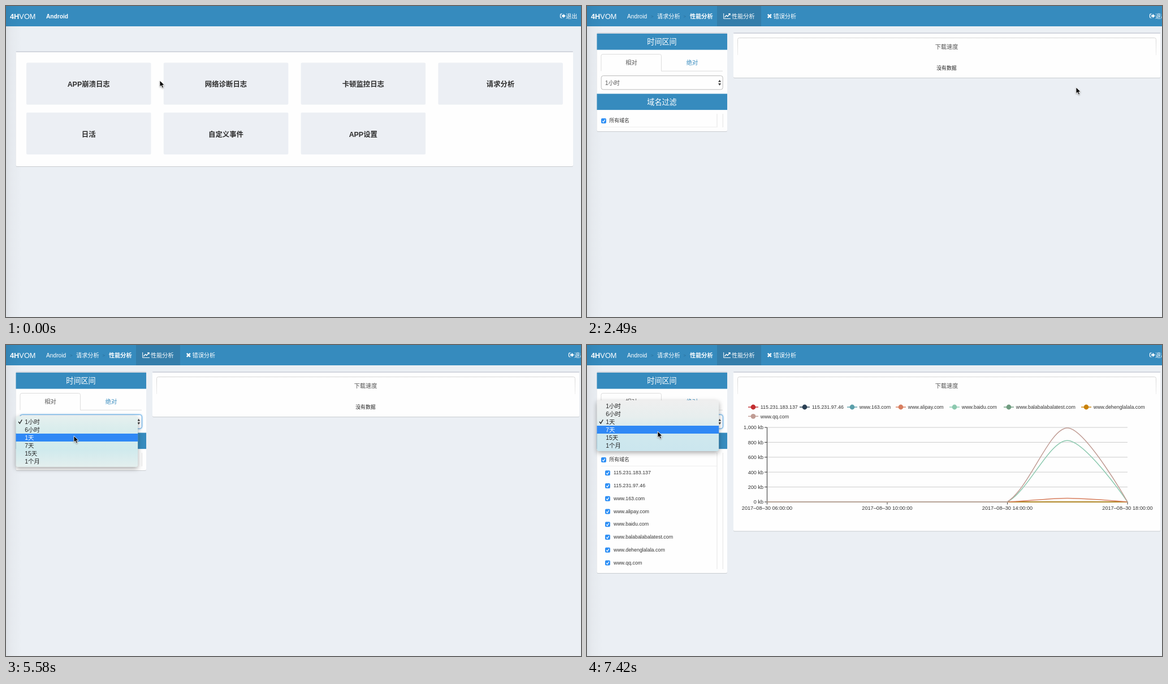
An HTML page that plays this animation: 1017x551 px, repeating every 8000 ms.

```html
<!DOCTYPE html>
<html lang="zh-CN">
<head>
<meta charset="utf-8">
<style>
  html, body { margin: 0; width: 100%; height: 100%; overflow: hidden; background: #ebeff4; }
  svg { display: block; width: 1017px; height: 551px;
    font-family: "Liberation Sans", "Noto Sans CJK SC", "Noto Sans CJK", sans-serif; }
  .panel { filter: drop-shadow(0 1px .7px rgba(0,0,0,.14)); }
  .menu { filter: drop-shadow(0 3px 4px rgba(0,0,0,.34)); }
  .focus { filter: drop-shadow(0 0 1.6px #66afe9); }
</style>
</head>
<body>
<svg id="stage" viewBox="0 0 1017 551"></svg>
<script>
const BLUE = '#368bbe', GREY = '#d2d6de', SIZE = 10.2, SMALL = 8.9, ROW = 14;
const HOURS = ['1小时', '6小时', '1天', '7天', '15天', '1个月'];
const SERIES = [
  { name: '115.231.183.137', color: '#c32e30', x: 294, peak: 0 },
  { name: '115.231.97.46', color: '#2a4054', x: 385, peak: 0 },
  { name: 'www.163.com', color: '#5b9faa', x: 469, peak: 0 },
  { name: 'www.alipay.com', color: '#d87e5f', x: 555, peak: 50 },
  { name: 'www.baidu.com', color: '#8cc9af', x: 650, peak: 824 },
  { name: 'www.balabalabalatest.com', color: '#6f9c80', x: 746, peak: 0 },
  { name: 'www.dehenglalala.com', color: '#c98208', x: 883, peak: 0 },
  { name: 'www.qq.com', color: '#c09c94', x: 294, peak: 992 }];

const rect = (x, y, w, h, fill, more = '') =>
  `<rect x="${x}" y="${y}" width="${w}" height="${h}" fill="${fill}" ${more}/>`;
const path = (d, stroke, more = '') => `<path d="${d}" fill="none" stroke="${stroke}" ${more}/>`;
const shape = (d, fill) => `<path d="${d}" fill="${fill}"/>`;
// y is the vertical centre of the line
const text = (x, y, str, size, fill, more = '') =>
  `<text x="${x}" y="${y + size * .37}" font-size="${size}" fill="${fill}" ${more}>${str}</text>`;
const MID = 'text-anchor="middle"', BOLD = 'font-weight="bold"';
const group = (id, body, more = '') => `<g id="${id}" ${more}>${body}</g>`;

const panel = (x, y, w, h) => `<g class="panel">${rect(x, y, w, h, '#fefefe', 'rx="2"')}</g>` +
  rect(x, y, w, 2, GREY, 'rx="1"');

const checkbox = (x, y) => rect(x, y, 9, 9, '#2e8ff5', 'rx="2"') +
  path(`M${x + 2.2} ${y + 4.8}l1.8 2 2.8-4.4`, '#fff', 'stroke-width="1.2"');

const exit = x => path(`M${x + 3.5} 14.2h-1.5q-1.5 0-1.5 1.5v3.8q0 1.5 1.5 1.5h1.5`, '#fff', 'stroke-width="1.2"') +
  shape(`M${x + 3} 16.2h2.6v-2.4l4 3.8-4 3.8v-2.4h-2.6z`, '#fff') + text(x + 10, 18, '退出', SIZE, '#fff');

function home() {
  const labels = ['APP崩溃日志', '网络诊断日志', '卡顿监控日志', '请求分析', '日活', '自定义事件', 'APP设置'];
  const cards = labels.map((label, i) => {
    const x = 36 + 242.8 * (i % 4), y = i < 4 ? 100.5 : 188.7;
    return rect(x, y, 220.5, 74.3, '#eceff4', 'rx="2"') +
      text(x + 110.2, y + 38.3, label, 12.4, '#2d2d2d', MID + ' font-weight="600"');
  });
  return text(71, 18, 'Android', SIZE, '#fff', BOLD) + exit(980) + panel(17.5, 80, 985.5, 204) + cards.join('');
}

function nav() {
  const label = (x, str, more) => text(x, 18, str, SIZE, '#fff', more);
  const chevron = x => text(x, 18.5, '&gt;', 8, '#2a6f98');
  return rect(230, 0, 78, 36, '#347daa') +
    label(71, 'Android') + chevron(113) + label(124, '请求分析') + chevron(170.5) + label(182, '性能分析', BOLD) +
    path('M241.7 13v9.4H254', '#fff') +
    path('M243.5 20l3-3.6 2.2 2 4-4.5M250.2 13.7h2.8v2.8', '#fff', 'stroke-width="1.4"') +
    label(256, '性能分析') +
    path('M319.8 14.8l6 6m0-6l-6 6', '#fff', 'stroke-width="2.4"') +
    label(329.5, '错误分析') + exit(995);
}

function filters() {
  const heading = (y, label) => rect(17.5, y, 230.5, 28.6, BLUE) +
    text(132.5, y + 14.5, label, 13.1, '#fff', MID + ' font-weight="500"');
  const side = bottom => path(`M230 191V${bottom}M240.3 191V${bottom}`, '#e3e3e3');
  const select = stroke => rect(25.2, 123.6, 215, 24.4, '#fefefe', `rx="3.5" stroke="${stroke}"`);
  const items = SERIES.map(({ name }, i) => {
    const y = 226 + 22.75 * i;
    return checkbox(32, y - 3.8) + text(47, y, name, SMALL, '#333');
  }).join('');
  return group('shortPanel', panel(17.5, 47, 230.5, 175) + side(215)) +
    group('longPanel', panel(17.5, 47, 230.5, 357) + side(397) + items) +
    heading(49, '时间区间') +
    path('M25 115.3V88.5q0-3 3-3H128.5q3 0 3 3V115.3H240', '#ddd') +
    text(78.5, 100.5, '相对', SIZE, '#555', MID) + text(186, 100.5, '绝对', SIZE, BLUE, MID) +
    select('#bbb') + group('focus', select('#6db3ea'), 'class="focus"') +
    group('choice', text(32, 136, HOURS[0], SIZE, '#555')) +
    shape('M232 134.7l2.6-4 2.6 4zM232 137l2.6 4 2.6-4z', '#444') +
    heading(155.5, '域名过滤') +
    checkbox(25, 199) + text(39.5, 202.5, '所有域名', SMALL, '#333') + path('M25 214.5H230', '#eee');
}

// Traffic from 14:00 to 18:00 with its peak in the middle; busy hosts also draw the idle hours before
function seriesPath(peak) {
  const step = 106.4, base = 278, x = 743.2, end = x + 2 * step, smooth = .3;
  if (!peak) return `M${x} ${base}H${end}`;
  const rise = peak * .132, top = base - rise, mid = x + step;
  const length = Math.hypot(step, rise), part = smooth * length / (length + step);
  return `M318.5 ${base}H${x}C${x + 2 * step * part} ${base - rise * part} ${mid - step * smooth} ${top} ${mid} ${top}` +
    `S${end} ${base} ${end} ${base}`;
}

function chart() {
  let out = '';
  SERIES.forEach(({ name, color, x }, i) => {
    const y = i < 7 ? 110 : 126.3;
    out += path(`M${x - 9} ${y}h18`, color, 'stroke-width="1.4"') +
      `<circle cx="${x}" cy="${y}" r="4.4" fill="${color}"/>` + text(x + 12.8, y, name, SMALL, '#333');
  });
  for (let i = 0; i <= 5; i++) {
    const y = 278 - 26.4 * i;
    out += path(`M318.5 ${y}H956`, '#ccc') + path(`M314 ${y}h4.5`, '#333') +
      text(312, y, (200 * i).toLocaleString('en') + ' kb', 9.1, '#333', 'text-anchor="end"');
  }
  out += path('M318.5 146V278.5H956', '#333');
  ['06', '10', '14', '18'].forEach((hour, i) => {
    const x = 318.5 + 212.5 * i;
    out += path(`M${x} 278v4.5`, '#333') + text(x, 288.3, `2017–08–30 ${hour}:00:00`, 9.2, '#333', MID);
  });
  const lines = [...SERIES].sort((a, b) => a.peak - b.peak)
    .map(({ color, peak }) => path(seriesPath(peak), color, 'stroke-width="1.5"'));
  return out + `<g clip-path="url(#reveal)">${lines.join('')}</g>`;
}

function results() {
  return group('noData', panel(259, 47, 755.3, 80) +
      text(636, 110, '没有数据', SMALL, '#222', MID + ' font-weight="500"')) +
    group('data', panel(259, 47, 755.3, 282.4) + chart()) +
    path('M266.5 87V59.5q0-3 3-3H1003.5q3 0 3 3V87', 'url(#fade)') +
    text(636, 72, '下载速度', SIZE, '#555', MID);
}

function menuBody(top, checked, active, tint) {
  return `<g class="menu">${rect(17.5, top, 215.7, 90, `url(#${tint})`, 'rx="3.5"')}</g>` +
    HOURS.map((label, i) => {
      const y = top + 9.8 + ROW * i, on = i === active, ink = on ? '#fff' : '#222';
      return (on ? rect(17.5, top + 3 + ROW * i, 215.7, ROW, '#2f88f5') : '') +
        (i === checked ? path(`M22 ${y}l2.3 3.2 4-6.6`, ink, 'stroke-width="1.4"') : '') +
        text(33.3, y, label, SIZE + .2, ink);
    }).join('');
}

const gradient = (id, colors, dir = 'x2="0" y2="1"') => `<linearGradient id="${id}" ${dir}>` +
  colors.map((color, i) => `<stop offset="${i / (colors.length - 1)}" stop-color="${color}"/>`).join('') +
  '</linearGradient>';

stage.innerHTML = '<defs>' +
  gradient('edge', ['rgba(0,0,0,.06)', 'rgba(0,0,0,.022)', 'rgba(0,0,0,.01)', 'rgba(0,0,0,0)'], '') +
  gradient('fade', ['#d5d5d5', '#eee'], 'gradientUnits="userSpaceOnUse" x1="0" x2="0" y1="56" y2="87"') +
  gradient('tintA', ['#e6f0ef', '#d6ecec', '#d0eaed', '#e4efee']) +
  gradient('tintB', ['#efefef', '#e7eeee', '#cfe8ee', '#cbe6ee']) +
  '<clipPath id="reveal"><rect id="revealBox" x="317" y="140" height="142" width="0"/></clipPath></defs>' +
  rect(0, 0, 1017, 551, '#ebeff4') + rect(0, 0, 1017, 36, BLUE) + rect(0, 0, 28, 551, 'url(#edge)') +
  text(7, 18.2, `<tspan ${BOLD}>4H</tspan>VOM`, 12.8, '#fff') +
  group('home', home()) +
  group('analysis', nav() + filters() + results()) +
  group('menu', '') +
  group('cursor', '<path d="M0 0v11.2l2.6-2.4 1.9 4.4 2.1-.9-1.9-4.2h3.6z" fill="#000" stroke="#fff" stroke-width=".9"/>',
    'style="filter:drop-shadow(0 1px .8px rgba(0,0,0,.35))"');

// The screen refreshes only once per TICK, so movement is eased but stepped
const TICK = 118;
const MOVES = [
  { from: 120, to: 120, x: 538, y: 132 }, { from: 360, to: 590, x: 638, y: 136 },
  { from: 710, to: 710, x: 616, y: 136 }, { from: 1070, to: 1890, x: 865, y: 144 },
  { from: 2960, to: 2960, x: 851, y: 158 }, { from: 3140, to: 3260, x: 2, y: 171 },
  { from: 3410, to: 3530, x: 56, y: 236 }, { from: 3640, to: 3760, x: 131, y: 86 },
  { from: 3870, to: 3990, x: 134, y: 138 }, { from: 4760, to: 5110, x: 120, y: 161 },
  { from: 6120, to: 6120, x: 135, y: 138 }, { from: 6920, to: 7270, x: 125, y: 153 }];

function cursorAt(t) {
  let x = 272, y = 132;
  for (const move of MOVES) {
    if (t < move.from) break;
    const steps = Math.round((move.to - move.from) / TICK) + 1;
    const p = Math.min(1, (Math.floor((t - move.from) / TICK) + 1) / steps);
    const eased = p * p * (3 - 2 * p);
    x += (move.x - x) * eased;
    y += (move.y - y) * eased;
  }
  return { x, y };
}

// The item under the cursor is active; a chosen item blinks before the menu fades
function menuAt(t, cursorY) {
  const first = t >= 4340 && t < 5850, second = t >= 6560;
  if (!first && !second) return '';
  const top = second ? 98 : 126, blink = t >= 5470 && t < 5580;
  const active = blink ? -1 : Math.floor((cursorY - top - 3) / ROW);
  return menuBody(top, second ? 2 : 0, active, second ? 'tintB' : 'tintA');
}

function revealAt(t) {
  const start = 6320, steps = Math.floor((t - start) / 120);
  return Math.max(0, Math.min(640, steps * 77));
}

const el = id => document.getElementById(id);
const show = (id, on) => el(id).setAttribute('display', on ? 'inline' : 'none');
let lastMenu, lastChoice;

function draw(t) {
  show('home', t < 2490);
  show('analysis', t >= 2490);
  show('shortPanel', t < 6290);
  show('longPanel', t >= 6290);
  show('noData', t < 6410);
  show('data', t >= 6410);
  show('focus', t >= 4490);

  const choice = t < 6120 ? HOURS[0] : HOURS[2];
  if (choice !== lastChoice) el('choice').firstChild.textContent = lastChoice = choice;

  const { x, y } = cursorAt(t);
  el('cursor').setAttribute('transform', `translate(${x} ${y})`);

  const menu = menuAt(t, y);
  if (menu !== lastMenu) el('menu').innerHTML = lastMenu = menu;
  el('menu').setAttribute('opacity', t >= 5700 && t < 5850 ? .55 : 1);
  el('revealBox').setAttribute('width', revealAt(t));
}

function tick() {
  draw(performance.now() % 8000);
  requestAnimationFrame(tick);
}
tick();
</script>
</body>
</html>
```
